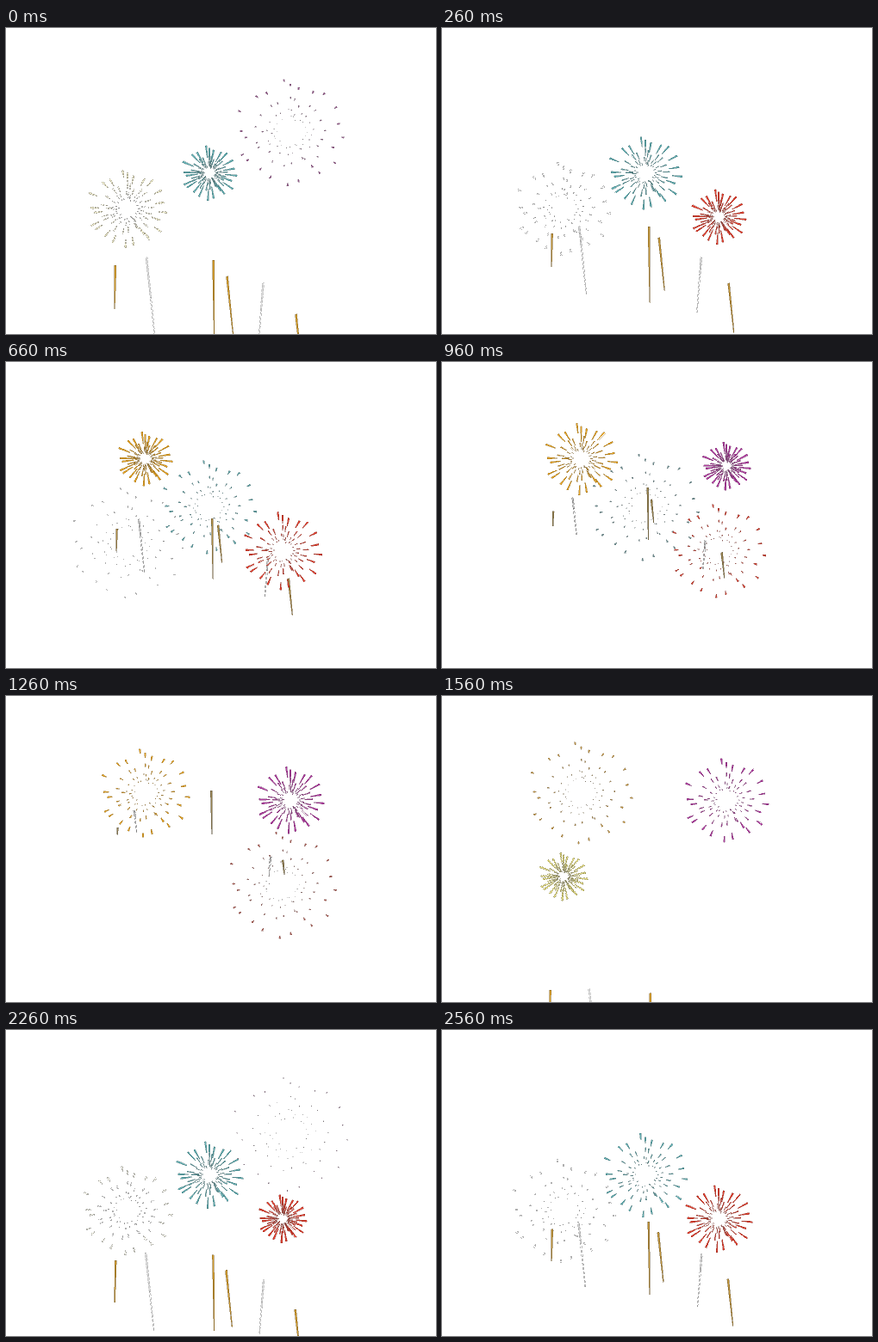
An HTML page for the animation above (2660 ms loop, 499 px wide and 356 px high).

```html
<!DOCTYPE html>
<html lang="en">
<head>
<meta charset="utf-8">
<title>Fireworks</title>
<style>
html, body { margin: 0; width: 100%; height: 100%; overflow: hidden; background: #fff; }
svg { display: block; width: 499px; height: 356px; shape-rendering: crispEdges; }
</style>
</head>
<body>
<svg id="stage" viewBox="0 0 499 356" width="499" height="356"></svg>
<script>
const LOOP = 2660, BURST_CYCLE = 21, ROCKET_CYCLE = 22.36, START = -2.1;
const stage = document.getElementById('stage');

// Ray tips as x, y pairs around the burst centre, in a circle of radius 58.
const TIPS = [-7,-57, 0,-52, 9,-48, 25,-44, 37,-42, 50,-27, 53,-9, 58,6, 47,17, 49,34,
  32,45, 24,38, 9,54, -3,58, -22,50, -33,41, -47,31, -53,25, -49,6, -54,-1,
  -56,-23, -37,-39, -26,-43];
const rays = [];
for (let i = 0; i < TIPS.length; i += 2) {
  rays.push({ a: Math.atan2(TIPS[i + 1], TIPS[i]), r: Math.hypot(TIPS[i], TIPS[i + 1]) / 58 });
}

const rings = [
  { turn: 0, size: 1, len: 1, width: 1.9 },
  { turn: 0.13, size: 0.66, len: 0.7, width: 1.2 },
  { turn: 0.05, size: 0.44, len: 0.4, width: 0.8 },
  { turn: 0.18, size: 0.31, len: 0.2, width: 0.6 }
];

const bursts = [
  { x: 141, y: 210, at: -4, last: 12.1, color: [222, 214, 130], pale: true },
  { x: 236, y: 168.5, at: 0, last: 12.1, color: [100, 176, 180] },
  { x: 321, y: 219.5, at: 3, last: 12.1, color: [226, 66, 50] },
  { x: 161.5, y: 112.5, at: 7.11, last: 11, color: [232, 166, 40] },
  { x: 330, y: 121, at: 11, last: 12.1, color: [178, 64, 162] }
];

// Heights of each rocket's head and tail at these steps; x follows a straight line.
const KEYS = [-3.36, 0, 3, 7, 13];
const rockets = [
  { x: 127, y: 276, lean: -0.02, head: [311, 276, 239, 194, 153], tail: [371, 327, 278, 220, 161], last: 15 },
  { x: 163, y: 267, lean: 0.105, head: [306, 267, 231, 183, 133], tail: [395, 360, 309, 244, 158], last: 15, grey: true },
  { x: 240.5, y: 270, lean: 0.014, head: [310, 270, 231, 182, 110], tail: [405, 358, 319, 252, 161], last: 15 },
  { x: 256.5, y: 289, lean: 0.105, head: [333, 289, 244, 190, 130], tail: [410, 356, 305, 233, 140], last: 11 },
  { x: 298.5, y: 297, lean: -0.078, head: [329, 297, 267, 229, 187], tail: [405, 360, 331, 273, 208], last: 15, grey: true },
  { x: 336.5, y: 333, lean: 0.107, head: [372, 333, 297, 252, 191], tail: [430, 392, 354, 294, 208], last: 15 }
];

const clamp = v => Math.max(0, Math.min(1, v));
const mod = (v, n) => ((v % n) + n) % n;
const mix = (a, b, t) => 'rgb(' + a.map((v, i) => Math.round(v + (b[i] - v) * t)) + ')';

function addPath(attrs) {
  const el = document.createElementNS('http://www.w3.org/2000/svg', 'path');
  set(el, attrs);
  stage.appendChild(el);
  return el;
}

function set(el, attrs) {
  for (const key in attrs) el.setAttribute(key, attrs[key]);
}

// Tapered bar from (x0, y0) to (x1, y1).
function bar(x0, y0, w0, x1, y1, w1) {
  const d = Math.hypot(x1 - x0, y1 - y0) || 1;
  const nx = (y0 - y1) / d / 2, ny = (x1 - x0) / d / 2;
  const point = (x, y, w) => (x + nx * w).toFixed(1) + ' ' + (y + ny * w).toFixed(1);
  return 'M' + point(x0, y0, w0) + 'L' + point(x1, y1, w1) +
    'L' + point(x1, y1, -w1) + 'L' + point(x0, y0, -w0) + 'Z';
}

function along(values, p) {
  let i = 0;
  while (i < KEYS.length - 2 && p > KEYS[i + 1]) i++;
  const t = (p - KEYS[i]) / (KEYS[i + 1] - KEYS[i]);
  return values[i] + (values[i + 1] - values[i]) * t;
}

function ringPath(b, ring, age) {
  const radius = 32 + 3.75 * age - 0.07 * age * age;
  const shrink = 1 - 0.5 * clamp((age - 10) / 2);
  const full = Math.min(0.48 * radius, 3 + 11 / (1 + Math.exp((age - 4.5) / 1.2)));
  const w = ring.width * shrink;
  return rays.map((ray, i) => {
    const wobble = ring.size < 1 ? 1 + 0.08 * Math.sin(i * 2.4) : 1;
    const out = radius * ray.r * ring.size * wobble;
    const inn = Math.max(out * 0.4, out - full * ring.len * shrink);
    const c = Math.cos(ray.a + ring.turn), s = Math.sin(ray.a + ring.turn);
    return bar(b.x + c * inn, b.y + s * inn, w * 0.3, b.x + c * out, b.y + s * out, w);
  }).join('');
}

function drawBurst(b, step) {
  const age = mod(step - b.at - START, BURST_CYCLE) + START;
  const on = age <= b.last;
  const worn = b.pale ? clamp((age + 1) / 8) : 0.8 * clamp((age - 6) / 6);
  b.paths.forEach((path, i) => {
    path.style.display = on ? '' : 'none';
    if (!on) return;
    const fade = clamp(worn + i * 0.15);
    set(path, {
      d: ringPath(b, rings[i], age),
      fill: mix(b.color, b.pale ? [250, 250, 250] : [125, 118, 118], fade),
      stroke: mix(b.color.map(v => v * 0.6), [125, 125, 125], fade)
    });
  });
}

function drawRocket(r, step) {
  const p = step < 15.4 ? step : step - ROCKET_CYCLE;
  const head = along(r.head, p), tail = along(r.tail, p);
  const on = p <= r.last && tail - head > 2;
  r.body.style.display = r.trail.style.display = on ? '' : 'none';
  if (!on) return;
  const xAt = y => r.x + (y - r.y) * r.lean;
  const worn = clamp((p + 1) / 12);
  const mid = r.grey ? head + (tail - head) * (p < 1 ? 0.5 : 0.3) : tail;
  set(r.body, {
    d: bar(xAt(mid), mid, r.grey ? 1.4 : 0.6, xAt(head), head, 2),
    fill: r.grey ? mix([222, 222, 222], [190, 190, 190], worn) : mix([226, 166, 44], [150, 130, 80], worn),
    stroke: r.grey ? mix([165, 165, 165], [90, 90, 90], worn) : mix([122, 92, 34], [98, 88, 66], worn)
  });
  set(r.trail, {
    d: r.grey ? bar(xAt(tail), tail, 0.6, xAt(mid), mid, 1.4) : '',
    stroke: mix([150, 150, 150], [105, 105, 105], worn)
  });
}

function draw(ms) {
  const t = mod(ms, LOOP);
  const step = t < 60 ? 0 : 1 + Math.floor((t - 60) / 100);
  rockets.forEach(r => drawRocket(r, step));
  bursts.forEach(b => drawBurst(b, step));
}

for (const r of rockets) {
  r.trail = addPath({ fill: 'none', 'stroke-width': 0.6, 'stroke-dasharray': '3 2' });
  r.body = addPath({ 'stroke-width': 0.5 });
  if (r.grey) set(r.body, { 'stroke-dasharray': '3 1.5' });
}
for (const b of bursts) {
  b.paths = rings.map(() => addPath({ 'stroke-width': 0.4 }));
  if (b.pale) b.paths.forEach(path => set(path, { 'stroke-width': 0.6, 'stroke-dasharray': '2 1.2' }));
}

const begin = performance.now();
function tick() {
  draw(performance.now() - begin);
  requestAnimationFrame(tick);
}
draw(0);
requestAnimationFrame(tick);
</script>
</body>
</html>
```
